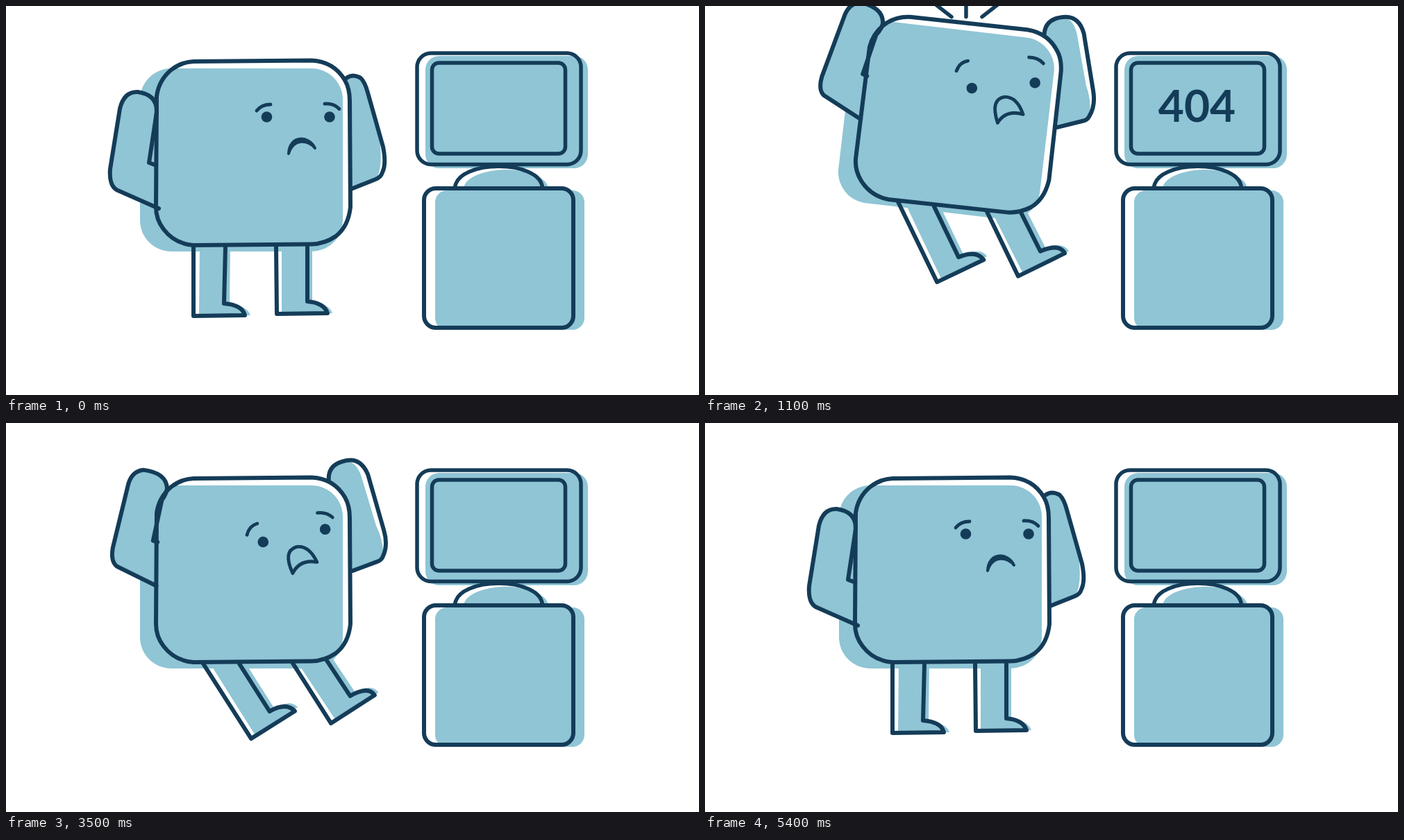
Recreate the animation shown at these times as an HTML page. Size 998 by 561 pixels, loop 6830 ms.

```html
<!DOCTYPE html>
<html lang="en">
<head>
<meta charset="utf-8">
<title>404</title>
<style>
  html, body { margin: 0; width: 100%; height: 100%; overflow: hidden; background: #fff; }
  svg { display: block; width: 998px; height: 561px; }
  .fill { fill: #8fc5d5; }
  .line { fill: none; stroke: #143c58; stroke-width: 6; stroke-linecap: round; stroke-linejoin: round; }
  .medium { stroke-width: 5.5; }
  .thin { stroke-width: 4.8; }
  .ink { fill: #143c58; }
  text { font: 700 64px Lato, "Open Sans", sans-serif; text-anchor: middle; }
</style>
</head>
<body>
<svg viewBox="0 0 998 561">
  <defs>
    <rect id="bodyFill" class="fill" x="193" y="90" width="292" height="264" rx="45"/>
    <path id="bodyLine" class="line" d="M270 80 L440 78.500 Q472 80 488 107 Q495 119 495 137 L496 290 Q493 318 475 332 Q459 343 440 343.500 L270 345 Q243 343 227 322 Q216 308 216 290 L217 130 Q220 107 238 92 Q252 81 270 80Z"/>
    <text id="code" class="ink" y="23">404</text>
  </defs>

  <g id="computer">
    <rect class="fill" x="604" y="72" width="234" height="162" rx="20"/>
    <path class="fill" d="M659 264 A61 28 0 0 1 781 264Z"/>
    <rect class="fill" x="618" y="266" width="215" height="201" rx="17"/>
    <rect class="line medium" x="592" y="68" width="236" height="160.500" rx="20"/>
    <rect class="line medium" x="613.500" y="82" width="192" height="131" rx="10"/>
    <path class="line medium" d="M646.500 262 C650 221 769 221 772.500 262"/>
    <rect class="line" x="602" y="263" width="215" height="201" rx="17"/>
  </g>

  <g id="sad">
    <path class="fill" d="M220 292 L158 267 Q146 260 149 237 L164 148 Q170 123 190 124 Q218 128 217 153 L217 292Z"/>
    <path class="fill" d="M497 262 L497 135 Q495 115 488 105 Q500 96 512 104 Q518 110 521 125 L538 190 Q543 232 534 248Z"/>
    <path class="fill" d="M279 340 L278 447 L352 446 Q347 432 322 430 L323 340Z"/>
    <path class="fill" d="M397 340 L397 443 L470 443 Q465 429 441 426 L441 340Z"/>
    <use href="#bodyFill"/>
    <use href="#bodyLine"/>
    <g class="line">
      <path d="M220 292 L160 265.500 Q148 259 150 235 L164 148 Q170 123 190 124 Q218 128 217 153 L206 226 L214 229"/>
      <path d="M490 104 Q500 97 511 104 Q517 110 521 125 L543 203 Q548 228 542 240 Q540 247 532 250 L497 264"/>
      <path d="M270 347 L270 447 L344 446 Q340 431 314 429 L316 347"/>
      <path d="M389 347 L390 444 L463 443 Q458 428 434 426 L434 347"/>
    </g>
    <circle class="ink" cx="375.500" cy="160" r="7.800"/>
    <circle class="ink" cx="466" cy="160" r="7.800"/>
    <path class="line thin" d="M361 151 Q368 142 381 142 M459 141 Q472 140 480 148.500"/>
    <path class="line" style="fill:#143c58;stroke-width:4" d="M407 213 C408 186 436 186 445 205 C436 193 414 190 407 213Z"/>
  </g>

  <g id="shocked">
    <path class="fill" d="M224 160 L170 125 Q162 117 169 98 L204 12 Q212 -10 230 -9 Q262 0 260 22 L240 100Z"/>
    <path class="fill" d="M506 180 L515 95 Q514 62 490 42 Q496 24 515 20 Q534 20 539 45 L550 120 Q558 145 553 165 L546 171Z"/>
    <path class="fill" d="M282 276 L333 392 L400 362 Q392 349 366 358 L334 286Z"/>
    <path class="fill" d="M408 296 L451 388 L518 358 Q510 343 485 353 L458 296Z"/>
    <g transform="translate(9.500 -55) rotate(8.400 356.500 211.500)">
      <use href="#bodyFill"/>
      <use href="#bodyLine"/>
    </g>
    <g class="line">
      <path d="M224 159 L172 123 Q164 115 170 96 L204 12 Q212 -10 230 -9 Q262 0 260 22 Q258 30 250 38 L229 94 L235 97"/>
      <path d="M492 44 Q494 24 515 21 Q542 16 549 45 L560 128 Q563 150 553 165 Q550 170 544 171 L507 179"/>
      <path d="M274 279 L327 397 L395 367 Q385 352 359 362 L326 288"/>
      <path d="M402 298 L444 392 L512 361 Q505 346 477 357 L451 301"/>
    </g>
    <circle class="ink" cx="385.500" cy="119" r="7.800"/>
    <circle class="ink" cx="476.500" cy="114" r="7.800"/>
    <path id="brows" class="line thin" d="M364 105.500 Q369 93 381 91.500 M469 89 Q482 89.500 489.500 98.500"/>
    <path class="line thin" d="M421 170 Q411 136 432 133 Q450 133 458 159 Q434 151 421 170Z"/>
  </g>

  <path id="rays" class="line medium" d="M355 0 L305 -39 M376 0 V-40 M399 0 L449 -39"/>

  <use id="plain" href="#code" transform="translate(708.500 144)"/>
  <use id="tilted" href="#code" transform="translate(709.500 145.500) rotate(-41) scale(.68 .42)"/>
  <g id="triple">
    <use href="#code" transform="translate(709.500 118.500) rotate(-12.500) scale(1.600 .36)"/>
    <use href="#code" transform="translate(709.500 144) rotate(-12.500) scale(1.600 .36)"/>
    <use href="#code" transform="translate(709.500 169.500) rotate(-12.500) scale(1.600 .36)"/>
  </g>
</svg>
<script>
const LOOP = 6830, REPEAT = 3400;
const JUMP = 100, LAND = 1600, CLEAR = 2000;
const TILT = 8.4, HEIGHT = 64.4, DRAWN_HEIGHT = 55;

const el = id => document.getElementById(id);
const show = (id, on) => el(id).setAttribute("display", on ? "inline" : "none");
const move = (id, transform) => el(id).setAttribute("transform", transform);
const between = (t, from, to) => t >= from && t < to;

// Two drawings per 100 ms: the first lasts 30 ms, the second 70 ms.
const step = t => Math.floor(t / 100) * 100 + (t % 100 >= 30 ? 30 : 0);

const height = t => HEIGHT * (1 - Math.cos(2 * Math.PI * (t - JUMP) / 1600)) / 2;

function tilt(t) {
  if (t < 650) return TILT * Math.sin(Math.PI / 2 * (t - JUMP) / 550);
  return TILT * (1 - Math.min(1, (t - 650) / 900) ** 2.3);
}

const browLift = t => 12 * Math.min(1, (t - JUMP) / 1000) ** 3;

function draw(time) {
  const loopTime = time % LOOP;
  const t = step(loopTime < JUMP + REPEAT ? loopTime : loopTime - REPEAT);
  const jumping = between(t, JUMP, LAND);

  show("sad", !jumping);
  show("shocked", jumping);
  show("rays", between(t, 250, 1400));
  show("triple", between(t, 200, 600));
  show("tilted", between(t, 600, 730));
  show("plain", between(t, 730, CLEAR));
  if (!jumping) return;

  const h = height(t), angle = tilt(t);
  const dx = 9.5 * (Math.min(1, angle / 6) - 1);
  move("shocked", `translate(${dx} ${DRAWN_HEIGHT - h}) rotate(${angle - TILT} 366 156.5)`);
  move("brows", `translate(0 ${-browLift(t)})`);
  move("rays", `translate(0 ${25.5 - h * 0.18})`);
}

const start = performance.now();
function tick() {
  draw(performance.now() - start);
  requestAnimationFrame(tick);
}
draw(0);
requestAnimationFrame(tick);
</script>
</body>
</html>
```
